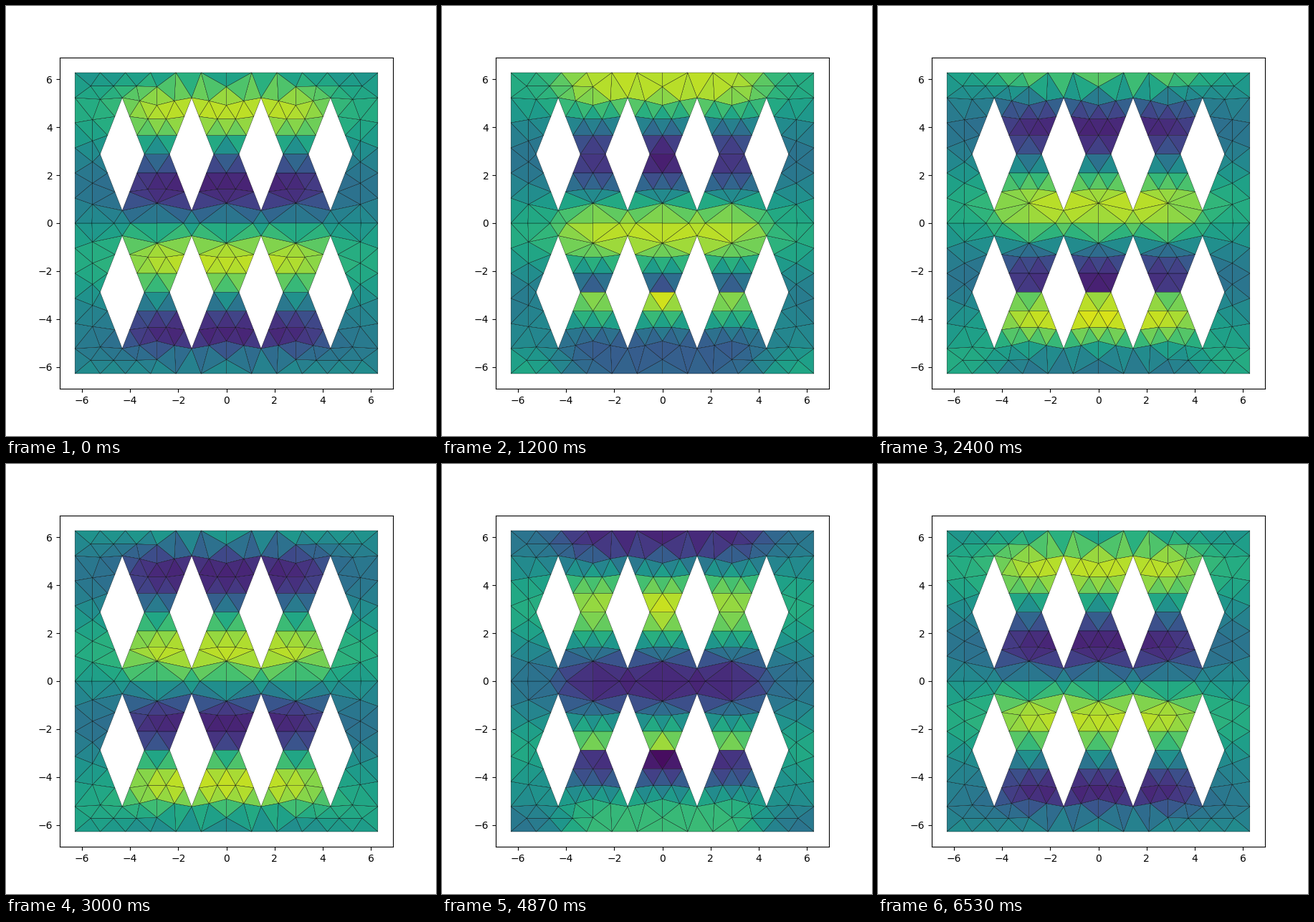
Write a matplotlib script that moves like this. It is 600 px wide and 600 px high and loops after 6590 ms.

```python
from itertools import product

import numpy as np
import matplotlib.pyplot as plt
from matplotlib.animation import FuncAnimation
from matplotlib.tri import Triangulation

FRAMES = 99
LOOP_MS = 6590
U = np.pi / 24                      # mesh unit
EDGE, STEP = 48, 8                  # half side of the square, outer spacing
HALF_W, HALF_H = 7, 18              # diamond hole
WAIST = 22                          # height of the hole centres
HOLES = list(product((-33, -11, 11, 33), (-WAIST, WAIST)))
CHANNELS = (-22, 0, 22)             # gaps between the holes
SIGNS = list(product((-1, 1), repeat=2))


def four_way(points, cx=0):
    """Reflect points in both axes, then shift them sideways."""
    return [(cx + sx * x, sy * y) for x, y in points for sx, sy in SIGNS]


def outer_square():
    side = range(-EDGE, EDGE + 1, STEP)
    return [p for s in (-EDGE, EDGE) for k in side for p in ((k, s), (s, k))]


def hole_outline(cx, cy):
    thirds = np.linspace(0, 1, 4)
    return [(cx + sx * HALF_W * t, cy + sy * HALF_H * (1 - t))
            for t in thirds for sx, sy in SIGNS]


def channel_points(cx):
    inner = [(0, 6.4), (2.9, 10.8), (0, 16)]
    outer = [(x, 2 * WAIST - y) for x, y in inner]
    return four_way(inner + outer + [(5.5, 39), (0, 43.5)], cx)


def centre_line():
    near_tips = [cx + s * 2.6 for cx, _ in HOLES for s in (-1, 1)]
    return [(x, 0) for x in (*CHANNELS, *near_tips, -42.6, 42.6)]


def side_strips():
    column = [(42.4, y) for y in np.linspace(33, 6, 5)]
    row = [(x, 43.7) for x in np.linspace(28.5, 43, 3)]
    return four_way(column + row + [(40, 39.5)])


def build_mesh():
    pts = outer_square() + centre_line() + side_strips()
    for hole in HOLES:
        pts += hole_outline(*hole)
    for cx in CHANNELS:
        pts += channel_points(cx)
    pts = np.unique(np.round(pts, 6), axis=0)

    tris = Triangulation(*pts.T).triangles
    x, y = pts[tris].mean(axis=1).T
    solid = np.ones(len(tris), bool)
    for cx, cy in HOLES:
        solid &= abs(x - cx) / HALF_W + abs(y - cy) / HALF_H > 1
    return Triangulation(*(pts.T * U), tris[solid]), x[solid] * U, y[solid] * U


def sigmoid(z):
    return 1 / (1 + np.exp(-z))


mesh, X, Y = build_mesh()

# amplitudes: a strong beam through the channels, a faint wave beside it
beam = sigmoid((4.15 - abs(X)) / 0.42)
neck = np.exp(-((abs(Y) - WAIST * U) / 0.8) ** 2)
middle = np.exp(-X**2)
up_amp = 0.11 + 0.29 * beam + beam * neck * (0.07 * middle - 0.05)
down_amp = 0.17 + 0.27 * sigmoid((Y + 5.1) / 0.3) + neck * (0.11 * middle - 0.08)
side_amp = 0.12 - 0.06 * np.exp(-((Y + 4.2) / 0.9) ** 2)
below = Y < -WAIST * U


def field(t):
    """Waves leaving the lower waist line, upwards and downwards."""
    up, down = np.sin(t - Y), -np.sin(t + Y)
    lower = beam * down_amp * down + (1 - beam) * side_amp * up
    return 0.5 + np.where(below, lower, up_amp * up)


fig, ax = plt.subplots(figsize=(6, 6), dpi=100)
faces = ax.tripcolor(mesh, facecolors=field(0), cmap="viridis", vmin=0, vmax=1,
                     edgecolors="k", linewidth=0.25)
limit = 1.1 * EDGE * U
ax.set(xlim=(-limit, limit), ylim=(-limit, limit))


def update(i):
    faces.set_array(field(2 * np.pi * i / (FRAMES - 1)))
    return [faces]


anim = FuncAnimation(fig, update, frames=FRAMES, interval=LOOP_MS / FRAMES,
                     repeat=True, repeat_delay=0)
plt.show()
```
